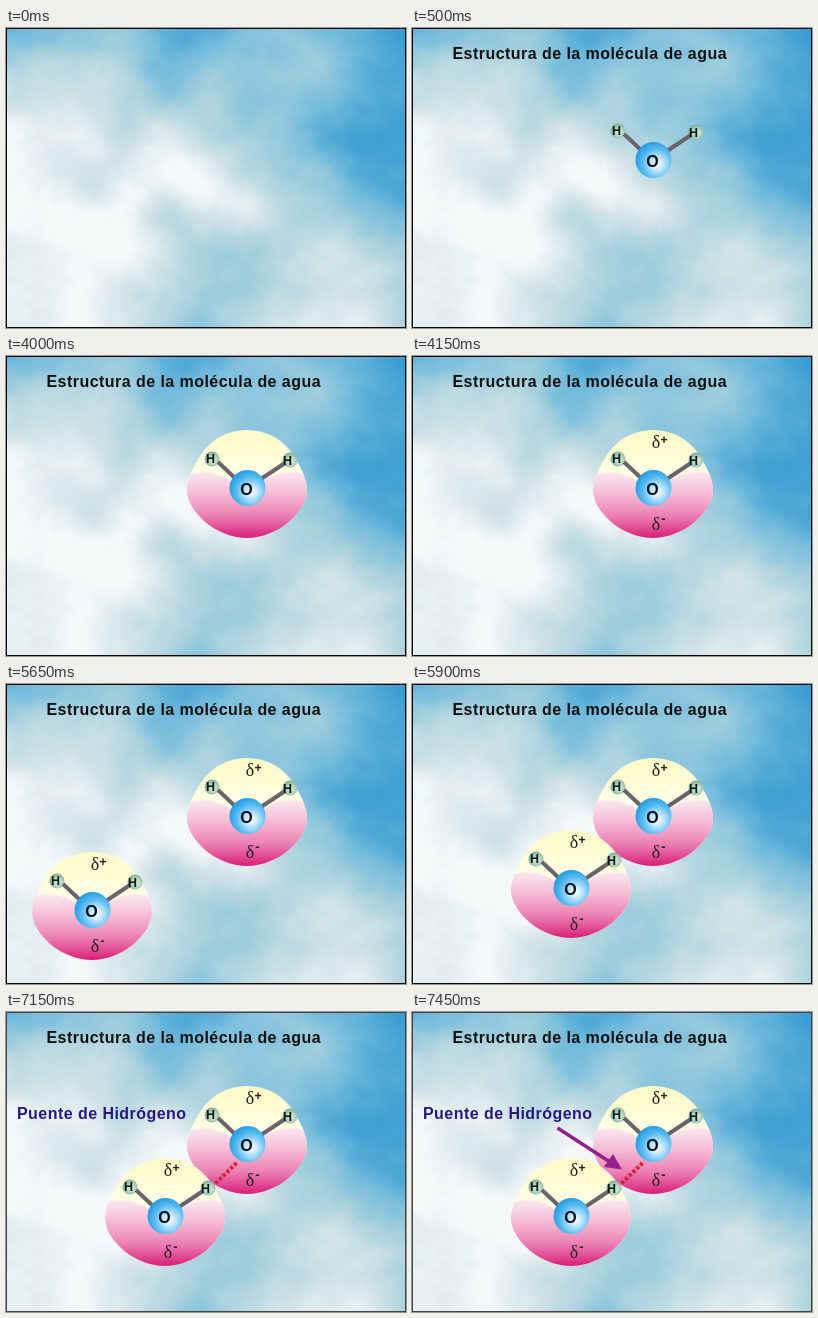
These frames come from a looping animation (400 px wide and 300 px high, 9.45 s). An HTML page with a canvas:

```html
<!DOCTYPE html>
<html lang="es">
<head>
<meta charset="utf-8">
<title>Estructura de la molécula de agua</title>
<style>
html, body { margin: 0; width: 100%; height: 100%; overflow: hidden; background: #fff; }
canvas { display: block; width: 100%; height: 100%; }
</style>
</head>
<body>
<canvas id="stage" width="400" height="300"></canvas>
<script>
const W = 400, H = 300, LOOP = 9450;
const ctx = document.getElementById('stage').getContext('2d');
const SANS = '"Liberation Sans", Arial, sans-serif';
const SERIF = '"Liberation Serif", Times, serif';

// Blueness of the sky on a coarse grid: 0 is white cloud, 9 deep blue
const SKY = [
  [7, 6, 5, 5, 7, 7, 6, 5, 6, 7, 9],
  [4, 3, 3, 4, 6, 5, 5, 5, 5, 7, 8],
  [2, 2, 2, 3, 4, 4, 5, 5, 6, 7, 8],
  [0, 1, 1, 3, 1, 3, 4, 5, 7, 8, 8],
  [0, 1, 2, 1, 0, 0, 3, 4, 5, 7, 8],
  [0, 0, 0, 0, 3, 2, 1, 3, 4, 5, 6],
  [1, 1, 0, 0, 2, 4, 4, 3, 2, 3, 4],
  [1, 1, 0, 2, 3, 4, 4, 3, 2, 2, 4],
  [1, 1, 0, 2, 4, 5, 3, 2, 1, 1, 4]
];
const RAMP = [[245, 248, 249], [209, 227, 231], [168, 209, 222], [118, 188, 220], [68, 163, 212], [40, 144, 202]];

const clamp = (v, a, b) => Math.min(b, Math.max(a, v));
const mix = (a, b, t) => a + (b - a) * t;

function hash(x, y) {
  let n = Math.imul(x, 374761393) + Math.imul(y, 668265263);
  n = Math.imul(n ^ (n >>> 13), 1274126177);
  return ((n ^ (n >>> 16)) >>> 0) / 4294967296;
}

function noise(x, y) {
  const i = Math.floor(x), j = Math.floor(y);
  let u = x - i, v = y - j;
  u *= u * (3 - 2 * u);
  v *= v * (3 - 2 * v);
  return mix(mix(hash(i, j), hash(i + 1, j), u), mix(hash(i, j + 1), hash(i + 1, j + 1), u), v);
}

// Fractal noise around zero
function cloud(x, y) {
  let sum = 0, amp = 0.5;
  for (let k = 0; k < 5; k++) {
    sum += amp * (noise(x, y) - 0.5);
    x = x * 2 + 17; y = y * 2 + 31; amp *= 0.55;
  }
  return sum;
}

function cubic(a, b, c, d, t) {
  return b + 0.5 * t * (c - a + t * (2 * a - 5 * b + 4 * c - d + t * (3 * (b - c) + d - a)));
}

function blueness(x, y) {
  const gx = clamp(x / 40, 0, 9.999), gy = clamp(y / 37.5, 0, 7.999);
  const i = Math.floor(gx), j = Math.floor(gy);
  const cols = [-1, 0, 1, 2].map(k => {
    const r = SKY[clamp(j + k, 0, 8)];
    return cubic(r[clamp(i - 1, 0, 10)], r[i], r[i + 1], r[clamp(i + 2, 0, 10)], gx - i);
  });
  return cubic(...cols, gy - j);
}

function makeSky() {
  const c = document.createElement('canvas');
  c.width = W; c.height = H;
  const g = c.getContext('2d'), img = g.createImageData(W, H);
  for (let y = 0, p = 0; y < H; y++) {
    for (let x = 0; x < W; x++, p += 4) {
      const wx = x + 22 * cloud(x / 32 + 50, y / 32);
      const wy = y + 22 * cloud(x / 32, y / 32 + 90);
      const v = clamp(blueness(wx, wy) + 1.5 * cloud(x / 30 + 7, y / 24 + 5), 0, 9.9) / 2;
      const k = Math.floor(v);
      for (let n = 0; n < 3; n++) img.data[p + n] = mix(RAMP[k][n], RAMP[k + 1][n], v - k);
      img.data[p + 3] = 255;
    }
  }
  g.putImageData(img, 0, 0);
  return c;
}

function text(s, x, y, size, color = '#111', align = 'left', font = SANS, weight = 'bold') {
  ctx.font = `${weight} ${size}px ${font}`;
  ctx.textAlign = align;
  ctx.fillStyle = color;
  ctx.fillText(s, x, y);
}

function heading(s, x, y, color) {
  ctx.letterSpacing = '0.45px';
  text(s, x, y, 16, color);
  ctx.letterSpacing = '0px';
}

function line(x1, y1, x2, y2, width, color) {
  ctx.lineWidth = width;
  ctx.strokeStyle = color;
  ctx.beginPath();
  ctx.moveTo(x1, y1);
  ctx.lineTo(x2, y2);
  ctx.stroke();
}

// Shaded sphere, its light shifted towards the lower right
function ball(x, y, r, shift, stops) {
  const g = ctx.createRadialGradient(x + shift, y + shift, 0, x + shift, y + shift, r + shift);
  stops.forEach((c, i) => g.addColorStop(i / (stops.length - 1), c));
  ctx.fillStyle = g;
  ctx.beginPath();
  ctx.arc(x, y, r, 0, Math.PI * 2);
  ctx.fill();
}

function gradient(y1, y2, ...stops) {
  const g = ctx.createLinearGradient(0, y1, 0, y2);
  stops.forEach((c, i) => g.addColorStop(i / (stops.length - 1), c));
  return g;
}

// Electron cloud, centred on the oxygen atom
function shell() {
  ctx.save();
  ctx.beginPath();
  ctx.moveTo(0, -58);
  ctx.bezierCurveTo(25, -58, 42, -43, 51, -25);
  ctx.bezierCurveTo(57, -14, 60, -6, 60, 3);
  ctx.bezierCurveTo(59, 24, 31, 50, 0, 50);
  ctx.bezierCurveTo(-31, 50, -59, 24, -60, 3);
  ctx.bezierCurveTo(-60, -6, -57, -14, -51, -25);
  ctx.bezierCurveTo(-42, -43, -25, -58, 0, -58);
  ctx.clip();
  ctx.fillStyle = gradient(-58, -8, '#fff9c8', '#fffcd6', '#fffeec');
  ctx.fillRect(-62, -60, 124, 112);
  ctx.fillStyle = gradient(-17, 50, '#fdeaf0', '#f6bdd6', '#ec80b3', '#d9207a');
  ctx.beginPath();
  ctx.moveTo(-62, -12);
  ctx.bezierCurveTo(-50, -18, -30, -17, -15, -6);
  ctx.lineTo(15, -6);
  ctx.bezierCurveTo(30, -17, 50, -18, 62, -12);
  ctx.lineTo(62, 52);
  ctx.lineTo(-62, 52);
  ctx.fill();
  ctx.restore();
}

function molecule(x, y, withShell, withCharge) {
  ctx.save();
  ctx.translate(x, y);
  if (withShell) shell();
  const green = ['#e2f0e6', '#b4d6c2', '#7fae98'];
  ball(-35, -29, 7.5, 1, green);
  ball(43, -28, 7.5, 1, green);
  line(-29, -26, -12, -10, 4, '#67646b');
  line(38, -25, 14, -9, 4, '#67646b');
  ball(0.5, 0, 18, 4, ['#ffffff', '#b4e2fa', '#5cbcf0', '#2a9fe2']);
  text('H', -36.5, -25, 12.5, '#0b1a12', 'center');
  text('H', 40.5, -23.5, 12.5, '#0b1a12', 'center');
  text('O', -0.5, 7, 16, '#0a0f18', 'center');
  if (withCharge) {
    text('δ', 3, -40, 18, '#222', 'center', SERIF, 'normal');
    text('+', 11, -44, 12, '#222', 'center');
    text('δ', 3, 42, 18, '#222', 'center', SERIF, 'normal');
    text('-', 10.5, 35, 13, '#222', 'center');
  }
  ctx.restore();
}

function angle() {
  text("104'5º", 226, 95, 13);
  ctx.lineWidth = 1;
  ctx.strokeStyle = '#111';
  ctx.beginPath();
  ctx.arc(243, 137, 35, -2.3, -0.8);
  ctx.stroke();
}

function bridge() {
  ctx.setLineDash([3.2, 2]);
  line(230.5, 151, 209, 172, 4, '#cf2440');
  ctx.setLineDash([]);
}

function arrow() {
  const color = '#93208c';
  line(145.5, 116, 198, 150, 3.5, color);
  ctx.fillStyle = color;
  ctx.beginPath();
  ctx.moveTo(210, 157.5);
  ctx.lineTo(192, 155);
  ctx.lineTo(201, 142);
  ctx.fill();
}

const sky = makeSky();

function draw(t) {
  ctx.drawImage(sky, 0, 0);
  if (t >= 500) {
    heading('Estructura de la molécula de agua', 40.5, 31, '#111');
    molecule(241, 132, t >= 4000, t >= 4150);
  }
  if (t >= 2000 && t < 4000) angle();
  if (t >= 5900) molecule(159, 204, true, true);
  else if (t >= 5650) molecule(86, 226, true, true);
  if (t >= 6150) bridge();
  if (t >= 7150) heading('Puente de Hidrógeno', 11, 107, '#29197d');
  if (t >= 7450) arrow();
  ctx.lineWidth = 1;
  ctx.strokeStyle = t < 6150 ? '#0a0a0a' : '#444';
  ctx.strokeRect(0.5, 0.5, W - 1, H - 1);
}

const start = performance.now();
function tick() {
  draw((performance.now() - start) % LOOP);
  requestAnimationFrame(tick);
}
tick();
</script>
</body>
</html>
```
